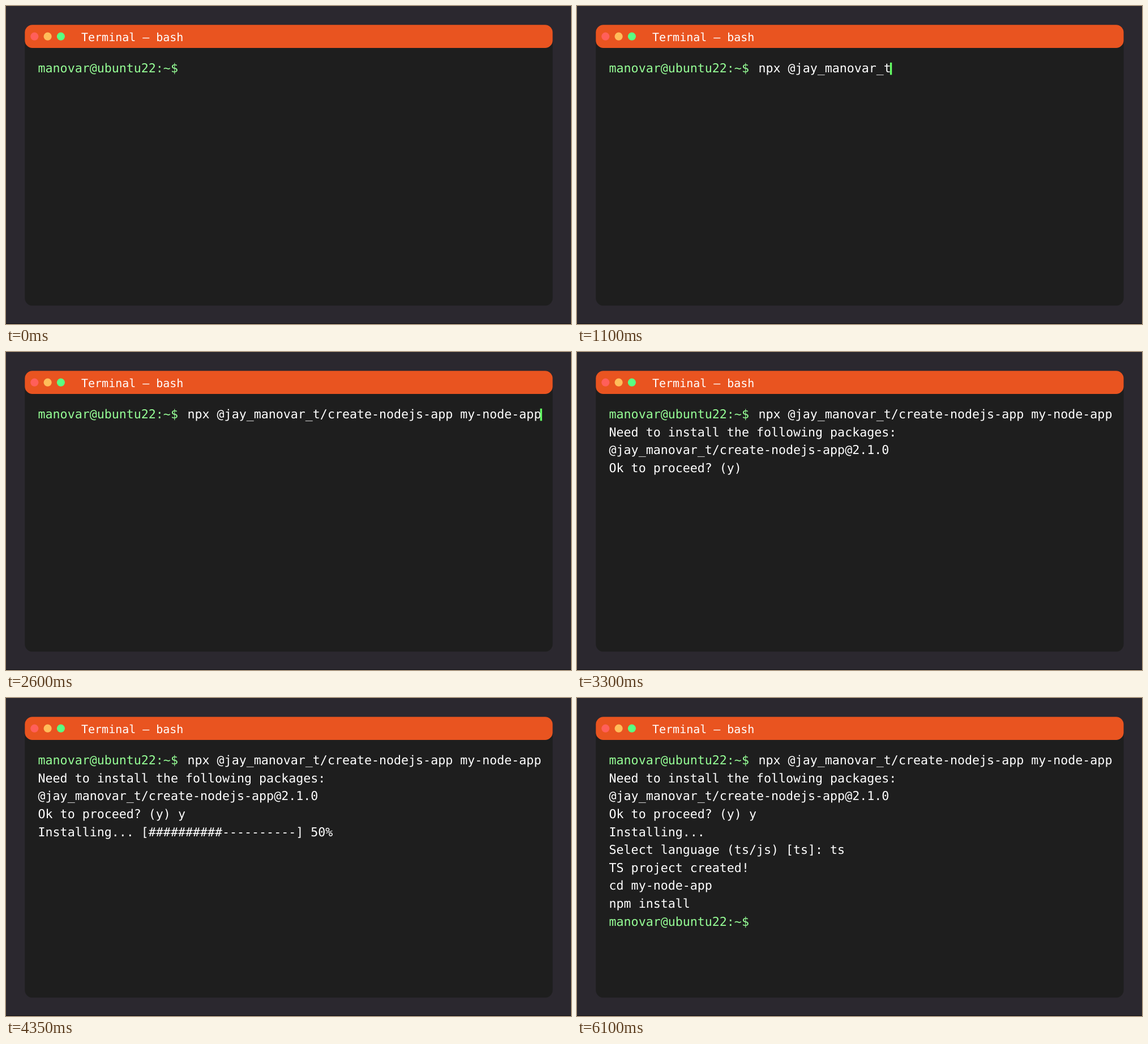
Recreate the animation shown at these times as an HTML page. Size 998 by 561 pixels, loop 8.3 s.

```html
<!DOCTYPE html>
<html lang="en">
<head>
<meta charset="utf-8">
<title>Terminal</title>
<style>
  html, body { margin: 0; width: 100%; height: 100%; overflow: hidden; background: #2b282f; }
  svg { display: block; width: 998px; height: 561px; }
  text {
    font: 26px "DejaVu Sans Mono", monospace;
    fill: #fff;
    white-space: pre;
    text-rendering: geometricPrecision;
  }
  .title { font-size: 24px; }
  .prompt { fill: #96ff96; }
</style>
</head>
<body>
<svg viewBox="0 0 1200 674.55">
  <rect width="1200" height="674.55" fill="#2b282f"/>
  <rect y="673.35" width="1200" height="1.2" fill="#151317"/>
  <rect x="40" y="40" width="1121" height="595.5" rx="16" fill="#1e1e1e"/>
  <rect x="40" y="40" width="1121" height="49" rx="16" fill="#e95420"/>
  <circle cx="60.5" cy="64.5" r="8.5" fill="#ff5f5a"/>
  <circle cx="88.5" cy="64.5" r="8.5" fill="#ffbd5a"/>
  <circle cx="116.5" cy="64.5" r="8.5" fill="#5aff82"/>
  <text class="title" x="160" y="75">Terminal — bash</text>
  <g id="screen"></g>
  <rect id="cursor" width="4" height="26" fill="#64ff64"/>
</svg>
<script>
  const LOOP = 8300, KEY = 50;
  const LEFT = 68, BASE = 141, LEADING = 38, CHAR = 26 * 1233 / 2048;
  const PROMPT = "manovar@ubuntu22:~$";
  const PACKAGE = "@jay_manovar_t/create-nodejs-app";
  const COMMAND = `npx ${PACKAGE} my-node-app`;
  const CONFIRM = "Ok to proceed? (y) ";
  const SELECT = "Select language (ts/js) [ts]: ";

  const screen = document.getElementById("screen");
  const cursor = document.getElementById("cursor");

  function addText(row, x = LEFT, className = "") {
    const el = document.createElementNS("http://www.w3.org/2000/svg", "text");
    el.setAttribute("x", x);
    el.setAttribute("y", BASE + row * LEADING);
    el.setAttribute("class", className);
    return screen.appendChild(el);
  }

  // One key per tick; the cursor shows from the first tick until just after the last key.
  const inputs = [
    { row: 0, start: 200, lead: PROMPT + " ", keys: COMMAND },
    { row: 3, start: 3500, lead: CONFIRM, keys: "y" },
    { row: 5, start: 5100, lead: SELECT, keys: "ts" }
  ];
  const ticks = (t, start) => Math.floor((t - start) / KEY);
  const typed = (t, { start, keys }) => keys.slice(0, Math.max(0, ticks(t, start)));
  const after = (at, text) => t => t >= at ? text : "";

  function installing(t) {
    if (t < 3850) return "";
    if (t >= 4900) return "Installing...";
    const done = ticks(t, 3850);
    return `Installing... [${"#".repeat(done)}${"-".repeat(20 - done)}] ${done * 5}%`;
  }

  const lines = [
    [addText(0, LEFT, "prompt"), () => PROMPT],
    [addText(0, LEFT + PROMPT.length * CHAR + 20), t => typed(t, inputs[0])],
    [addText(1), after(2900, "Need to install the following packages:")],
    [addText(2), after(3100, PACKAGE + "@2.1.0")],
    [addText(3), t => t < 3300 ? "" : CONFIRM + typed(t, inputs[1])],
    [addText(4), installing],
    [addText(5), t => t < 4900 ? "" : SELECT + typed(t, inputs[2])],
    [addText(6), after(5500, "TS project created!")],
    [addText(7), after(5700, "cd my-node-app")],
    [addText(8), after(5900, "npm install")],
    [addText(9, LEFT, "prompt"), after(6100, PROMPT)]
  ];

  function draw(t) {
    for (const [el, textAt] of lines) {
      const text = textAt(t);
      if (el.textContent !== text) el.textContent = text;
    }
    const active = inputs.find(i => t >= i.start && ticks(t, i.start) <= i.keys.length);
    cursor.style.visibility = active ? "visible" : "hidden";
    if (active) {
      const shown = (active.lead + typed(t, active)).trimEnd();
      cursor.setAttribute("x", LEFT + shown.length * CHAR + 2);
      cursor.setAttribute("y", 120 + active.row * LEADING);
    }
  }

  const begin = performance.now();
  function frame() {
    draw((performance.now() - begin) % LOOP);
    requestAnimationFrame(frame);
  }
  frame();
</script>
</body>
</html>
```
